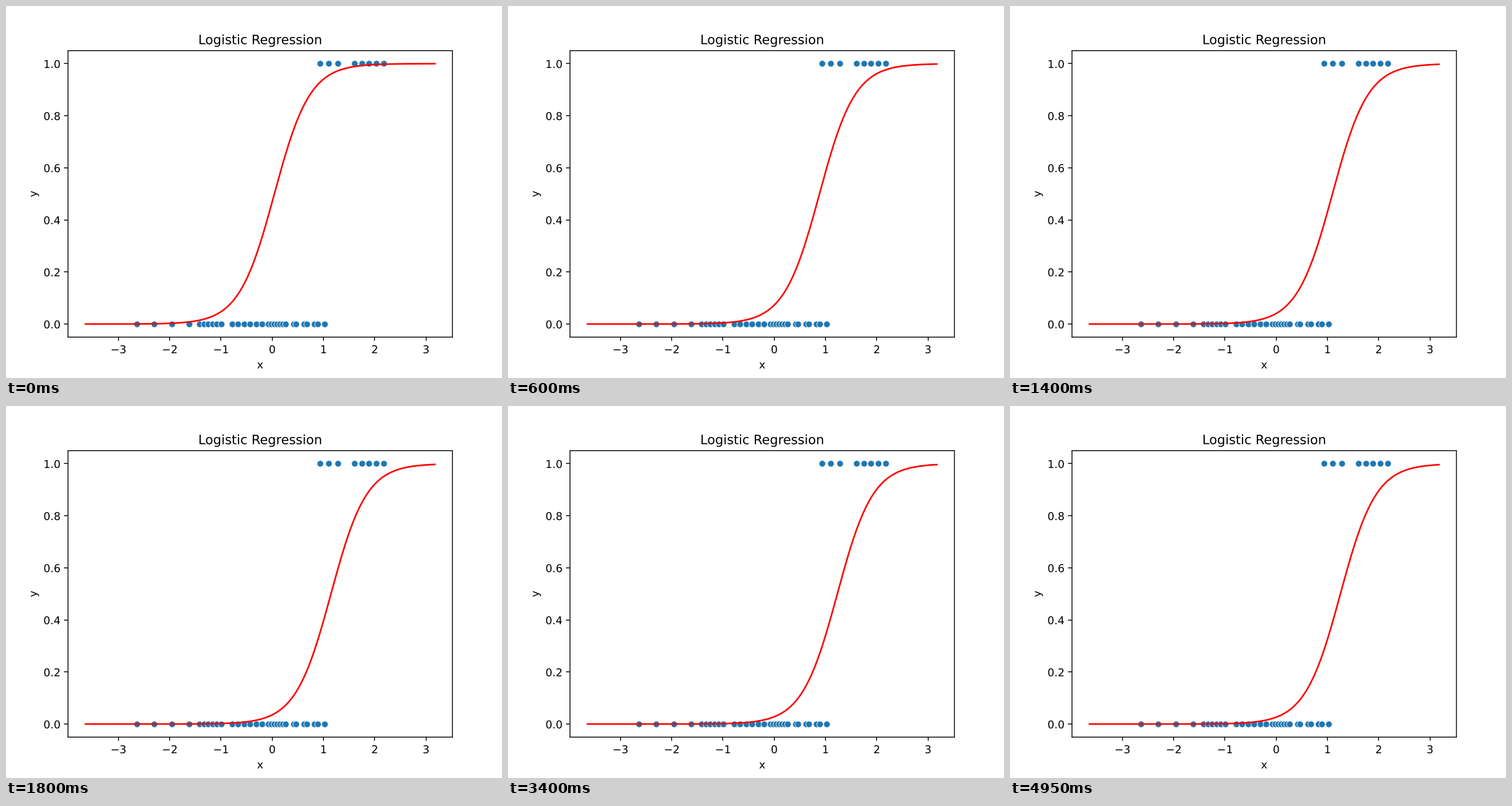
A matplotlib script that plays this animation: 864 by 648 pixels, repeating every 5000 ms.

```python
import numpy as np
import matplotlib.pyplot as plt
from matplotlib.animation import FuncAnimation
from matplotlib.patheffects import Normal

FRAMES, INTERVAL = 100, 50

SLOPE = 2.88
BIAS_START, BIAS_END = -0.12, -3.63
STIFFNESS = 0.7

# Text as outlines and unsnapped lines keep sub-pixel positions.
plt.rcParams.update({"path.snap": False, "path.effects": [Normal()]})


def runs(*spans):
    """Evenly spaced dots for each (first, last, count)."""
    return np.concatenate([np.linspace(*span) for span in spans])


def bias(step):
    """Bias after some descent steps: fast at first, then settling."""
    rate = 0.0405 + 0.01 * np.exp(-step / 15)
    start = 1 - np.exp(-STIFFNESS * (BIAS_START - BIAS_END))
    return BIAS_END - np.log(1 - start * np.exp(-rate * step)) / STIFFNESS


def predict(x, step):
    return 1 / (1 + np.exp(-SLOPE * x - bias(step)))


zeros = runs((-2.644, -1.622, 4), (-1.42, -0.997, 6), (-0.782, -0.2, 6),
             (-0.072, 0.255, 7), (0.417, 1.02, 4), (0.462, 0.89, 3))
ones = runs((0.932, 1.279, 3), (1.604, 2.174, 5))
x = np.concatenate([zeros, ones])
y = np.repeat([0, 1], [len(zeros), len(ones)])
grid = np.linspace(x.min() - 1, x.max() + 1, 200)
pad = 0.05 * np.ptp(grid)

fig, ax = plt.subplots(figsize=(6.4, 4.8), dpi=135)
ax.scatter(x, y, s=36, color="tab:blue", edgecolor="white", linewidth=0.48)
curve, = ax.plot(grid, predict(grid, 0), color="red", lw=1.5)
ax.set(title="Logistic Regression", xlabel="x", ylabel="y",
       xlim=(grid[0] - pad, grid[-1] + pad), ylim=(-0.05, 1.05))


def update(step):
    curve.set_ydata(predict(grid, step))
    return curve,


anim = FuncAnimation(fig, update, frames=FRAMES, interval=INTERVAL,
                     repeat=True, repeat_delay=0)
plt.show()
```
